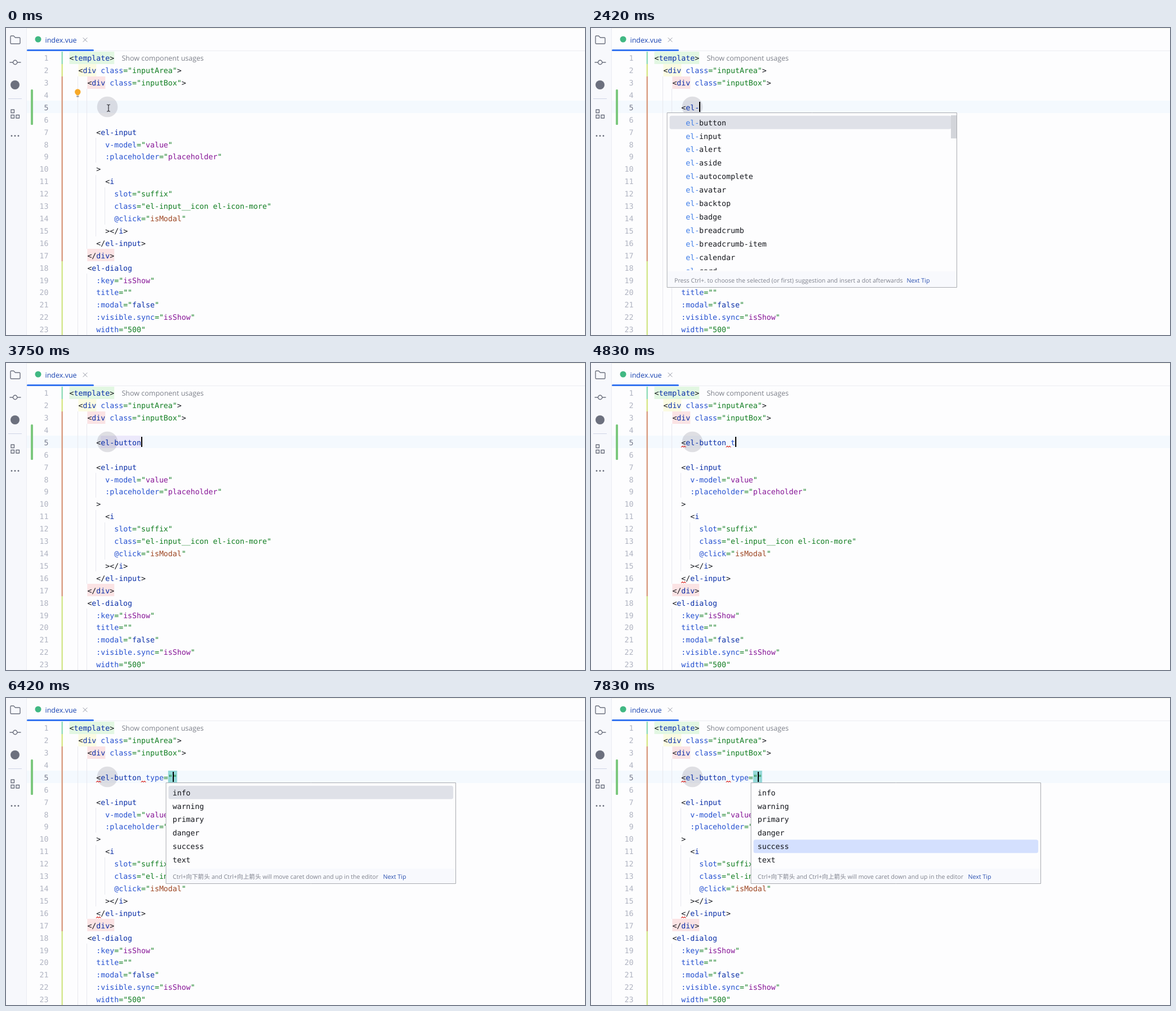
These frames come from a looping animation (1028x545 px, 8000 ms). An HTML page with a canvas:

```html
<!DOCTYPE html>
<html lang="en">
<head>
<meta charset="utf-8">
<title>Editor completion</title>
<style>
html, body { margin: 0; width: 100%; height: 100%; overflow: hidden; background: #fdfdfe; }
canvas { display: block; }
</style>
</head>
<body>
<canvas id="stage" width="1028" height="545"></canvas>
<script>
const ctx = document.getElementById('stage').getContext('2d');
const LOOP = 8000;
const CELL = 7.97, LEFT = 112.5, LINE = 21.91, ROW = 23.93, POPUP_TOP = 150;
const MONO = '13.24px "DejaVu Sans Mono", monospace';
const SERIF_MONO = '13.2px "Liberation Mono", "Noto Sans CJK SC", monospace';
const sans = size => `${size}px "Open Sans", "Noto Sans CJK SC", sans-serif`;
const INK = '#14161c', TAG = '#0a2fa8', ATTR = '#2450d0', STR = '#107d20';
const ICON = '#6c707e', VUE = '#41b883', LINK = '#2a50b0', MATCH = '#3f7de8';

const code = [
  '<template>',
  '  <div class="inputArea">',
  '    <div class="inputBox">',
  '', '', '',
  '      <el-input',
  '        v-model="value"',
  '        :placeholder="placeholder"',
  '      >',
  '        <i',
  '          slot="suffix"',
  '          class="el-input__icon el-icon-more"',
  '          @click="isModal"',
  '        ></i>',
  '      </el-input>',
  '    </div>',
  '    <el-dialog',
  '      :key="isShow"',
  '      title=""',
  '      :modal="false"',
  '      :visible.sync="isShow"',
  '      width="500"',
];

const words = text => text.split(' ');
const vueList = {
  items: words('Component component keep-alive KeepAlive slot s Suspense suspense Teleport teleport Transition transition'),
  x: 135, thumb: 28,
  icon: name => name === 's' ? 'tag' : VUE,
  note: name => name === 's' ? '' : 'vue',
};
const elementList = match => ({
  items: words('button input alert aside autocomplete avatar backtop badge breadcrumb breadcrumb-item calendar card').map(n => 'el-' + n),
  x: 135, thumb: 41, match,
});
const attrList = {
  items: words('type tabindex title translate typeof v-text v-slot v-slot:… v-html about aria-colcount aria-current'),
  x: 215, thumb: 29, match: 't',
  icon: name => name === 'type' ? '#3f8ff7' : name.startsWith('v-') ? VUE : null,
  note: name => name === 'type' ? '类型 string' : '',
};
const valueList = { items: words('info warning primary danger success text'), x: 284, values: true };

const steps = [
  [0, { typed: '', caret: false, idle: true, list: null, picked: 0, focus: false, usage: false, errors: 0 }],
  [170, { caret: true }],
  [500, { typed: '<', idle: false }],
  [580, { list: vueList }],
  [1170, { caret: false }],
  [1670, { caret: true }],
  [1830, { typed: '<e' }],
  [1920, { list: elementList('e') }],
  [2000, { typed: '<el' }],
  [2080, { list: elementList('el') }],
  [2420, { typed: '<el-', list: elementList('el-') }],
  [2830, { typed: '<el-button' }],
  [2920, { list: null }],
  [3750, { usage: true }],
  [4250, { typed: '<el-button ', usage: false }],
  [4580, { errors: 1 }],
  [4670, { errors: 2 }],
  [4830, { typed: '<el-button t' }],
  [5080, { list: attrList }],
  [5750, { caret: false }],
  [6250, { caret: true }],
  [6330, { typed: '<el-button type=""', list: null }],
  [6420, { list: valueList }],
  [7250, { caret: false }],
  [7330, { picked: 1, focus: true }],
  [7500, { picked: 2 }],
  [7750, { picked: 3, caret: true }],
  [7830, { picked: 4 }],
];
const stateAt = t => Object.assign({}, ...steps.filter(s => s[0] <= t).map(s => s[1]));

const colX = col => LEFT + col * CELL;
const lineY = n => 53.8 + (n - 1) * LINE;
const lineTop = n => Math.round(lineY(n) - 12);
const baseline = middle => Math.round(middle + 4.4);

function rect(x, y, w, h, color, radius = 0) {
  ctx.fillStyle = color;
  ctx.beginPath();
  ctx.roundRect(x, y, w, h, radius);
  ctx.fill();
}
function disc(x, y, r, color) {
  ctx.fillStyle = color;
  ctx.beginPath();
  ctx.arc(x, y, r, 0, 7);
  ctx.fill();
}
function stroke(path, color, width = 1.4) {
  ctx.strokeStyle = color;
  ctx.lineWidth = width;
  ctx.stroke(new Path2D(path));
}
function label(text, x, y, color, font = MONO, align = 'left') {
  ctx.font = font;
  ctx.fillStyle = color;
  ctx.textAlign = align;
  ctx.fillText(text, x, y);
}
// Draws [text, color] runs side by side on the character grid.
function runs(parts, x, y) {
  for (const [text, color] of parts) {
    if (!text) continue;
    label(text, x, y, color);
    x += text.length * CELL;
  }
}

function valueColor(name, value) {
  if (value === 'false') return TAG;
  if (name[0] === '@') return '#9c4420';
  return /^(:|v-)/.test(name) ? '#861496' : STR;
}
function drawCode(n, text) {
  const token = /(<\/?)([\w-]*)|([:@\w.-]+)(?:(=")([^"]*)("))?|>/g;
  for (const m of text.matchAll(token)) {
    const [all, bracket, tag, attr, open, value, close] = m;
    let parts = [[all, INK]];
    if (bracket) parts = [[bracket, INK], [tag, TAG]];
    else if (attr) parts = [[attr, ATTR], [open, STR], [value, valueColor(attr, value)], [close, STR]];
    runs(parts, colX(m.index), baseline(lineY(n)));
  }
}
function mark(n, col, length, color) {
  rect(colX(col), lineTop(n), length * CELL, 22, color);
}
function squiggle(n, col) {
  stroke(`M${colX(col)} ${lineY(n) + 8} l2 -2 l2 2 l2 -2 l2 2`, '#e0413c', 1.1);
}

function drawSidebar() {
  rect(0, 0, 36, 545, '#f7f8fc');
  rect(36, 0, 1, 545, '#ebecf2');
  stroke('M8 15.5 q0 -1.5 1.5 -1.5 h4 l3 3 h7 q1.5 0 1.5 1.5 v8 q0 1.5 -1.5 1.5 h-14 q-1.5 0 -1.5 -1.5 z', ICON);
  stroke('M7 61 h5.5 M20 61 h6 M12.5 61 a3.7 3.7 0 1 0 7.4 0 a3.7 3.7 0 1 0 -7.4 0', ICON);
  disc(16, 101, 8, ICON);
  rect(4, 125, 24, 1, '#cfd4e6');
  stroke('M9 145 h5.5 v5.5 h-5.5 z M9 154.500 h5.5 v5.5 h-5.5 z M18 154.500 h5.5 v5.5 h-5.5 z', ICON);
  for (const x of [10, 16, 22]) disc(x, 191.5, 1.4, ICON);
}

function drawTab() {
  rect(37, 0, 991, 1, '#f3f4ea');
  rect(37, 40, 991, 1, '#ebecf2');
  rect(37, 38, 119, 3, '#3574f0', 1.5);
  disc(57, 20, 5.5, VUE);
  label('index.vue', 69.5, 26, '#1540b0', sans(12.5));
  stroke('M137 17.5 l7 7 M144 17.5 l-7 7', '#9296a3', 1);
}

function drawGutter() {
  const bars = [[1, 2, '#8fdcb8'], [2, 3, '#d6e684'], [3, 18, '#d99a7e'], [18, 24, '#d2e68a']];
  for (const [from, to, color] of bars)
    rect(98.5, lineTop(from), 2.4, lineTop(to) - lineTop(from), color);
  rect(44, 109, 4, 63, '#7cc87e', 1.5);
  code.forEach((_, i) =>
    label(i + 1, 75.5, baseline(lineY(i + 1)), i === 4 ? '#767a8c' : '#afb3c1', MONO, 'right'));
}

function drawGuides() {
  const guides = [[2, 3, 23], [4, 4, 16], [4, 19, 23], [6, 8, 9], [6, 11, 15], [8, 12, 14]];
  for (const [col, from, to] of guides)
    rect(Math.round(colX(col)) - 1, lineTop(from), 1, lineTop(to + 1) - lineTop(from), '#e7e8ee');
}

function drawEditor(s) {
  rect(37, lineTop(5), 991, 22, '#f4f9fe');
  drawGuides();
  drawGutter();
  mark(1, 0, 10, '#e2f7e2');
  mark(2, 2, 4, '#fbfbe2');
  mark(3, 4, 4, '#fbe3e4');
  mark(17, 4, 6, '#fbe3e4');
  if (s.usage) mark(5, 7, 9, '#ece9fb');
  const quoted = s.typed.endsWith('""');
  if (quoted) mark(5, 22, 2, '#93d8d8');
  disc(180, 140, 18.3, 'rgba(110,110,130,.21)');
  code.forEach((text, i) => drawCode(i + 1, i === 4 ? ' '.repeat(6) + s.typed : text));
  label('Show component usages', 205.5, 58, '#7d808a', sans(12.5));
  if (s.errors > 0) {
    squiggle(5, 6);
    squiggle(5, 16);
  }
  if (s.errors > 1) squiggle(16, 6);
  if (s.idle) {
    disc(127.3, 113.5, 5.2, '#f7a928');
    rect(125, 117, 4.6, 2.5, '#f7a928');
    rect(125, 120.5, 4.6, 2, '#8b8e98', 1);
    stroke('M179.5 136 q2.5 0 2.5 1.5 q0 -1.5 2.5 -1.5 M182 137 v10 M179.5 148 q2.5 0 2.5 -1.5 q0 1.5 2.5 1.5', '#2a2a30', 1.2);
  }
  if (s.caret) {
    const col = 6 + s.typed.length - (quoted ? 1 : 0);
    rect(Math.round(colX(col)), lineTop(5) + 2, 2, 18, '#000');
  }
}

function drawItem(list, name, i) {
  const x = list.x + (list.values ? 11.7 : 33.2);
  const middle = 168.2 + i * ROW, y = baseline(middle);
  const at = list.match ? name.indexOf(list.match) : -1;
  if (at < 0) label(name, x, y, INK);
  else {
    const end = at + list.match.length;
    runs([[name.slice(0, at), INK], [list.match, MATCH], [name.slice(end), INK]], x, y);
  }
  const icon = list.icon && list.icon(name);
  if (icon === 'tag') stroke(`M${list.x + 19} ${middle - 5} l-4.5 4.5 l4.5 4.5 M${list.x + 23} ${middle - 5} l4.5 4.5 l-4.5 4.5`, '#8b8fa0', 1.1);
  else if (icon) disc(list.x + 20.5, middle - 1.5, 5.5, icon);
  const note = list.note && list.note(name);
  if (note) label(note, list.x + 497.3, y, '#8a8d98', note === 'vue' ? MONO : SERIF_MONO, 'right');
}

function drawPopup(s) {
  const list = s.list;
  const width = 515, height = list.values ? 180 : 311;
  const bottom = POPUP_TOP + height, footer = bottom - (list.values ? 27 : 29);
  rect(list.x, POPUP_TOP, width, height, '#fdfdfe');
  rect(list.x, footer, width, bottom - footer, '#f8f9fd');
  rect(list.x + 4.5, 155.7 + s.picked * ROW, list.values ? 505.5 : 500, 23.8, s.focus ? '#d4e0fe' : '#dfe1e8', 3.5);
  ctx.save();
  ctx.beginPath();
  ctx.rect(list.x, POPUP_TOP, width, Math.min(footer, 430) - POPUP_TOP);
  ctx.clip();
  list.items.forEach((name, i) => drawItem(list, name, i));
  ctx.restore();
  if (list.thumb) rect(list.x + 504, 155, 10, list.thumb, '#d3d5da');
  const tip = list.values
    ? 'Ctrl+向下箭头 and Ctrl+向上箭头 will move caret down and up in the editor'
    : 'Press Ctrl+. to choose the selected (or first) suggestion and insert a dot afterwards';
  const tipY = bottom - 9;
  label(tip, list.x + (list.values ? 12 : 13), tipY, '#7f828d', sans(10.65));
  label('Next Tip', list.x + (list.values ? 385 : 425) + 0.5, tipY, LINK, sans(10.65));
  ctx.strokeStyle = '#a9abb0';
  ctx.lineWidth = 1;
  ctx.strokeRect(list.x + 0.5, POPUP_TOP + 0.5, width - 1, height - 1);
}

function draw(now) {
  const s = stateAt(now % LOOP);
  ctx.textRendering = 'geometricPrecision';
  ctx.lineCap = ctx.lineJoin = 'round';
  rect(0, 0, 1028, 545, '#fdfdfe');
  drawEditor(s);
  drawSidebar();
  drawTab();
  if (s.list) drawPopup(s);
}

const start = performance.now();
function tick() {
  draw(performance.now() - start);
  requestAnimationFrame(tick);
}
tick();
</script>
</body>
</html>
```
